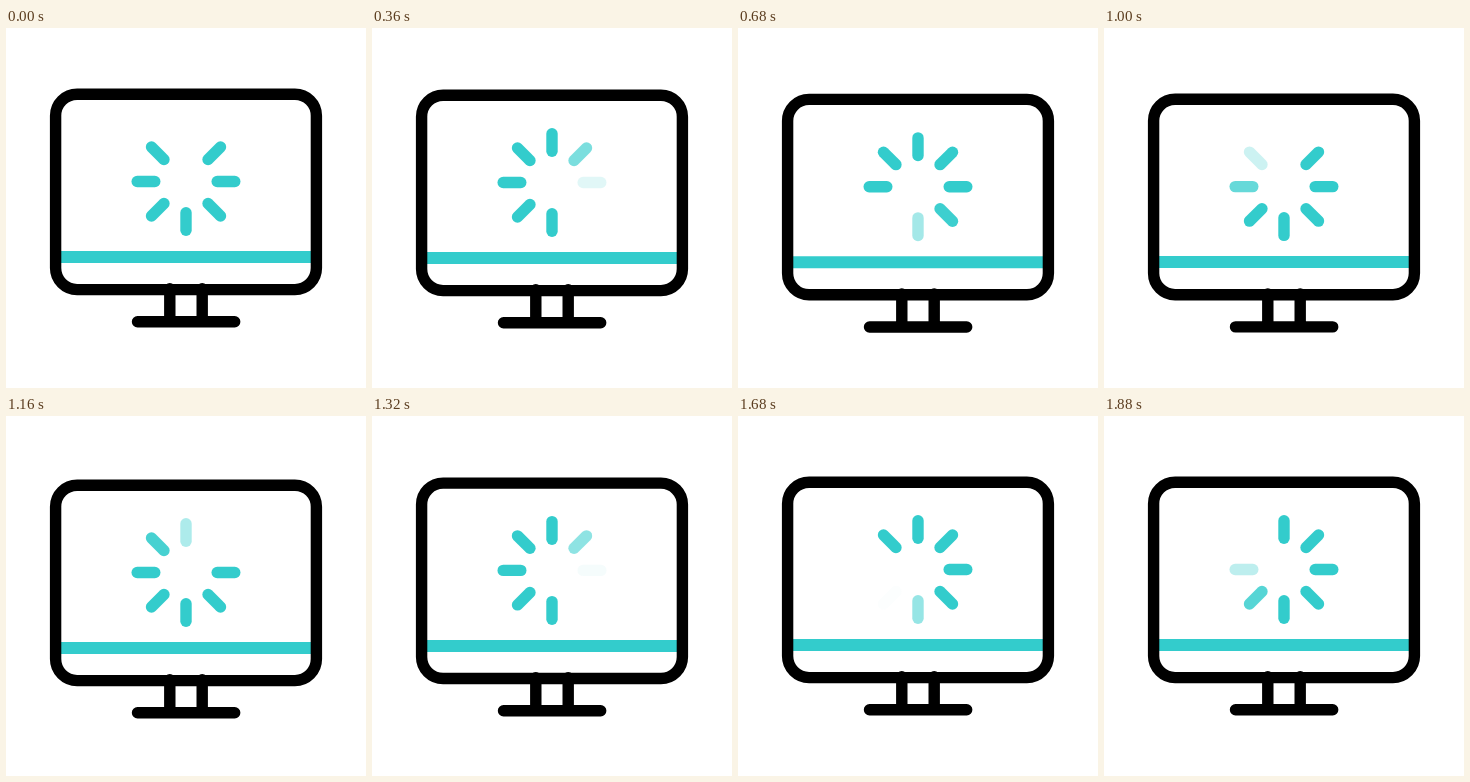
These frames come from a looping animation (360 by 360 pixels, 1.92 s). An HTML page:

```html
<!DOCTYPE html>
<html lang="en">
<head>
<meta charset="utf-8">
<title>Loading monitor</title>
<style>
  html, body { margin: 0; width: 100%; height: 100%; overflow: hidden; background: #fff; }
  svg { display: block; width: 100%; height: 100%; }
</style>
</head>
<body>
<svg viewBox="0 0 360 360" fill="none" stroke-linecap="round" stroke-width="11.4">
  <g id="monitor">
    <path d="M55 229H305" stroke="#33cccc" stroke-width="12" stroke-linecap="butt"/>
    <g stroke="#000">
      <rect x="49.6" y="66.2" width="260.8" height="195.4" rx="21.5"/>
      <path d="M163.8 260.8V293.8M196.2 260.8V293.8M131.5 293.8H228.7"/>
    </g>
    <g id="spinner" stroke="#33cccc" transform="translate(180 153.5)"></g>
  </g>
</svg>
<script>
  const LOOP = 1920, STEP = 40, HOLD = 120, SPOKES = 8;
  const monitor = document.getElementById('monitor');
  const spinner = document.getElementById('spinner');
  const clamp = v => Math.min(1, Math.max(0, v));

  const spokes = Array.from({ length: SPOKES }, (_, i) => {
    const line = document.createElementNS('http://www.w3.org/2000/svg', 'path');
    line.setAttribute('d', 'M0 -31.2V-48.8');
    line.setAttribute('transform', `rotate(${i * 360 / SPOKES})`);
    return spinner.appendChild(line);
  });

  // Dips 6px and returns between 185 and 1485 ms.
  const dip = t => 3 * (1 - Math.cos(2 * Math.PI * clamp((t - 185) / 1300)));

  // A spoke vanishes for one beat, then fades in over the next two.
  function spokeOpacity(i, beat) {
    const turns = Math.floor((Math.floor(beat) - i) / SPOKES);
    if (turns < 0) return 1;
    return clamp((beat - i - turns * SPOKES - 1) / 2);
  }

  function render(time) {
    const t = Math.floor((time % LOOP) / STEP) * STEP;
    const beat = t < HOLD ? 0 : 0.37 + t * 0.00813;
    monitor.setAttribute('transform', `translate(0 ${dip(t).toFixed(2)})`);
    spokes.forEach((s, i) => s.setAttribute('opacity', spokeOpacity(i, beat).toFixed(3)));
  }

  const start = performance.now();
  function tick() {
    render(performance.now() - start);
    requestAnimationFrame(tick);
  }
  tick();
</script>
</body>
</html>
```
